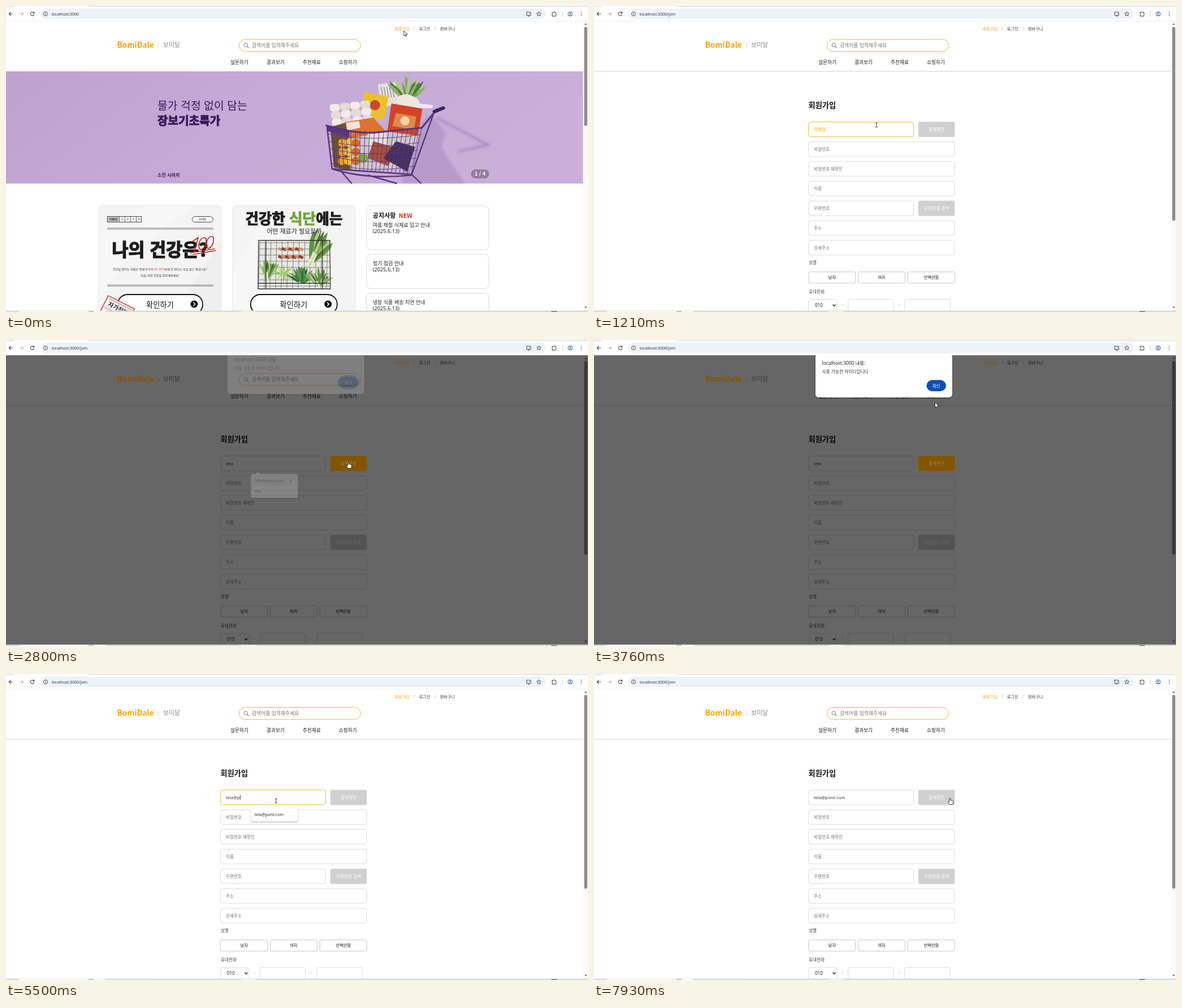
An HTML page that plays this animation: 1030 by 543 pixels, repeating every 8 s.

```html
<!DOCTYPE html>
<html lang="ko">
<head>
<meta charset="utf-8">
<title>회원가입</title>
<style>
html, body { margin: 0; width: 100%; height: 100%; overflow: hidden; background: #fff; }
svg { display: block; width: 1030px; height: 543px; }
text { font-family: 'Noto Sans CJK KR', 'Noto Sans KR', sans-serif; white-space: pre; }
text.latin { font-family: 'Noto Sans', 'Noto Sans CJK KR', sans-serif; }
</style>
</head>
<body>
<svg id="stage" viewBox="0 0 1030 543" xmlns="http://www.w3.org/2000/svg">
  <defs>
    <linearGradient id="lilac" x2="1" y2=".25">
      <stop offset="0" stop-color="#bfa1cf"/><stop offset=".45" stop-color="#c5a9d6"/><stop offset="1" stop-color="#c9afd9"/>
    </linearGradient>
    <filter id="lift" x="-10%" y="-20%" width="120%" height="150%">
      <feDropShadow dx="0" dy="1" stdDeviation="1.3" flood-opacity=".4"/>
    </filter>
    <filter id="blur"><feGaussianBlur stdDeviation="2"/></filter>
  </defs>
</svg>
<script>
const stage = document.getElementById('stage');
const ORANGE = '#ffa500', LINE = '#dcdcdc';

function add(parent, tag, attrs, text) {
  const node = document.createElementNS('http://www.w3.org/2000/svg', tag);
  for (const k in attrs) node.setAttribute(k, attrs[k]);
  if (text !== undefined) node.textContent = text;
  parent.appendChild(node);
  return node;
}
const group = (parent, attrs = {}) => add(parent, 'g', attrs);
// y is the middle of the line of text
const label = (p, x, y, size, text, fill = '#333', more = {}) =>
  add(p, 'text', { x, y: y + size * .36, 'font-size': size, fill, ...more }, text);
const rect = (p, x, y, w, h, fill, more = {}) =>
  add(p, 'rect', { x, y, width: w, height: h, fill, ...more });
const box = (p, x, y, w, h, rx, stroke = LINE, fill = '#fff') =>
  rect(p, x, y, w, h, fill, { rx, stroke });
const path = (p, d, stroke, width = 1, more = {}) =>
  add(p, 'path', { d, fill: 'none', stroke, 'stroke-width': width, ...more });
const shape = (p, d, fill, more = {}) => add(p, 'path', { d, fill, ...more });
const dot = (p, cx, cy, r, fill, more = {}) => add(p, 'circle', { cx, cy, r, fill, ...more });
const show = (node, on) => node.setAttribute('opacity', on ? 1 : 0);
const MID = { 'text-anchor': 'middle' }, BOLD = { 'font-weight': 700 }, LATIN = { class: 'latin' };
// Extra heavy display lettering
const heavy = (color, width) => ({ 'font-weight': 900, stroke: color, 'stroke-width': width });

let seed = 11;
const rnd = (a, b) => {
  seed = (seed * 16807) % 2147483647;
  return a + (b - a) * seed / 2147483647;
};

// Slim leaves fanning out from a root
function leaves(p, x, y, n, len, from, to, colors) {
  for (let i = 0; i < n; i++) {
    const a = rnd(from, to), l = rnd(.5, 1) * len, w = rnd(.08, .2);
    const tip = (turn, k) => `${x + Math.cos(a + turn) * l * k} ${y - Math.sin(a + turn) * l * k}`;
    shape(p, `M${x} ${y}Q${tip(w, .75)} ${tip(0, 1)}Q${tip(-w, .75)} ${x} ${y}`, colors[i % colors.length]);
  }
}

function buildCart(p) {
  shape(p, 'M705 235L752 192L778 226L770 250L812 315H700Z', '#a384bb', { opacity: .45, filter: 'url(#blur)' });
  path(p, 'M762 198L852 246M856 246L800 258', '#9a79b4', 4, { opacity: .6, filter: 'url(#blur)' });
  // groceries
  const greens = ['#6a9a4a', '#8fb565', '#4a7a38', '#b3cb88'];
  shape(p, 'M658 139L690 135L694 172L664 182Z', '#e2dfe0');
  for (let i = 0; i < 5; i++) path(p, `M${664 + i * 5} 144l3 18`, '#777', 1);
  leaves(p, 709, 170, 46, 48, .6, 2.4, greens);
  shape(p, 'M692 162Q706 152 722 161Q736 166 730 182L692 184Z', '#ede9da');
  shape(p, 'M724 172L756 176L754 181L722 182Z', '#eee9ee');
  shape(p, 'M634 152L677 161L668 203L627 192Z', '#ecc02a');
  dot(p, 653, 176, 9, '#cf4630');
  for (let r = 0; r < 3; r++) for (let i = 0; i < 4; i++)
    rect(p, 573 + i * 18 + r * 2, 174 + r * 13 - i * 2, 17.5, 13, ['#f1ece7', '#e4dcd8'][(i + r) % 2], { rx: 5 });
  shape(p, 'M682 173L737 182L728 234L675 222Z', '#d24426');
  shape(p, 'M690 190L726 196L722 220L684 213Z', '#dd8a4a');
  dot(p, 706, 204, 8, '#f0d3a6');
  shape(p, 'M574 215L604 206L610 292L580 286Z', '#6d5135');
  shape(p, 'M600 206L650 198L672 222L606 236Z', '#dd7330');
  shape(p, 'M602 207L625 204L627 216L604 221Z', '#f0e5da');
  shape(p, 'M608 238L668 222L728 230L714 288L612 292Z', '#cfc5cf');
  for (let i = 0; i < 9; i++) dot(p, 595 + (i % 3) * 12, 243 + (i / 3 | 0) * 16, 7.5, ['#e99a2c', '#efbf3d', '#d66a2c'][i % 3]);
  shape(p, 'M640 226L672 222L676 258L646 264Z', '#e6e2e1');
  shape(p, 'M650 240L692 252L676 284L640 270Z', '#a8503f');
  shape(p, 'M690 240L724 250L710 294L668 270Z', '#45315c');
  dot(p, 632, 270, 9, '#86a553');
  // cart frame
  const ink = '#55357b';
  for (let i = 0; i <= 20; i++) {
    const k = i / 20;
    path(p, `M${568 + 168 * k} ${214 + 8 * Math.sin(k * 3.1)}L${577 + 140 * k} ${289 + 10 * k}`, ink, .9);
  }
  for (let j = 1; j < 6; j++)
    path(p, `M${568 + j * 1.7} ${214 + j * 13}Q${640} ${228 + j * 14} ${738 - j * 3} ${214 + j * 14}`, ink, .9);
  shape(p, 'M567 211L607 220L608 233L568 222Z', '#59357f');
  path(p, 'M567 212Q610 226 650 225L736 216L757 190L774 182', ink, 3, { 'stroke-linecap': 'round' });
  path(p, 'M757 190L718 299L577 289L568 214M718 299L735 315M577 289Q640 309 718 300M592 292L612 315M640 300L692 315', ink, 2.4);
  path(p, 'M758 187L774 181', '#3b2360', 6, { 'stroke-linecap': 'round' });
}

function goButton(p, x, w, tx, cx) {
  box(p, x, 512, w, 35, 17, '#111').setAttribute('stroke-width', 1.8);
  label(p, tx, 530, 13.3, '확인하기', '#111', { ...MID, 'font-weight': 500 });
  dot(p, cx, 529, 6.5, '#111');
  path(p, `M${cx - 1.5} 525.8l3 3.2l-3 3.2`, '#fff', 1.5);
}

function buildHome(p) {
  rect(p, 0, 116, 1021, 199, 'url(#lilac)');
  const plum = '#39195c', black = '#1c1c1c';
  label(p, 268, 177.5, 19.4, '물가 걱정 없이 담는', plum, { 'font-weight': 300 });
  label(p, 268, 203.5, 20.2, '장보기초특가', plum, heavy(plum, .9));
  label(p, 268, 300, 8.1, '소진 시까지', plum, BOLD);
  buildCart(p);
  rect(p, 823, 290, 32, 16, '#927da1', { rx: 8 });
  label(p, 839, 298, 9.2, '1 / 4', '#fff', { ...MID, ...BOLD });

  // health check card
  box(p, 164, 354, 217, 200, 7, '#e6e6e6', '#f4f4f4');
  shape(p, 'M165 400L250 356H330L220 440L165 520Z', '#f7f7f7');
  shape(p, 'M300 540L380 420V540Z', '#efefef');
  box(p, 179.5, 373.5, 60, 10, 0, '#444', 'none');
  rect(p, 180, 374, 20, 9, '#ccc');
  label(p, 190, 378.5, 4.4, '수험번호', '#111', { ...MID, ...BOLD });
  for (let i = 0; i < 4; i++) {
    path(p, `M${200.5 + i * 10} 373.5v10`, '#444', .8);
    label(p, 205.5 + i * 10, 378.5, 5, i + 1, '#222', MID);
  }
  box(p, 329.5, 373.5, 37, 10, 5, '#444', '#fafafa');
  label(p, 348, 378.5, 4.6, '보미달', '#222', MID);
  path(p, 'M179 394h188M179 396h188M179 495h188M179 497h188', '#666', .8);
  label(p, 187.5, 432.5, 31.5, '나의 건강은?', black, heavy(black, 1.5));
  path(p, 'M331 417L340 411L333 436M351 411C341 411 338 432 345 432C353 432 358 411 351 411M364 409C355 409 351 429 358 430C366 430 371 409 364 409M326 438L369 431M331 441L371 434', '#b3271f', 1.7, { 'stroke-linecap': 'round' });
  const line = label(p, 272.5, 467, 5.1, '', '#333', MID);
  add(line, 'tspan', {}, '건강을 챙기는 사람은 전체 인구의 ');
  add(line, 'tspan', { fill: '#d33a2c' }, '20~30%');
  add(line, 'tspan', {}, '밖에 안 된다는 사실 알고 계셨나요?');
  label(p, 272.5, 478, 5.1, '지금, 바로 건강을 확인해보세요!', '#333', MID);
  goButton(p, 198, 150, 272.5, 333);
  const stamp = group(p, { transform: 'translate(181 514) rotate(27)' });
  rect(stamp, 0, 0, 52, 42, '#f8f5f3', { stroke: '#d2412f', 'stroke-width': 1.6 });
  path(stamp, 'M3 4H49M3 21H49', '#d2412f', .8);
  label(stamp, 26, 12.5, 10.5, '자가진단', '#222', { ...MID, ...BOLD });

  // diet card
  box(p, 401, 354, 217, 200, 7, '#e6e6e6', '#f4f4f4');
  shape(p, 'M402 470L470 356H560L450 540H402Z', '#f7f7f7');
  const head = label(p, 509.5, 378, 25.6, '', black, { ...MID, 'font-weight': 900, 'stroke-width': 1.1 });
  [['건강한 ', black], ['식단', '#6ea63b'], ['에는', black]].forEach(([s, c]) => add(head, 'tspan', { fill: c, stroke: c }, s));
  rect(p, 449, 418, 123, 83, '#e8e8e3');
  for (let i = 0; i < 13; i++) path(p, `M${449 + i * 10} 418l-2 83`, '#555', .7);
  for (let j = 0; j < 8; j++) path(p, `M448 ${420 + j * 11}h125`, '#555', .7);
  const green = ['#5f9145', '#8bb35f', '#456f36', '#b4cd8e'];
  for (let i = 0; i < 14; i++) {
    const x = 482 + (i % 7) * 6, y = i < 7 ? 430 : 444;
    path(p, `M${x} ${y}l8 3`, i % 2 ? '#8b4038' : '#c59770', 5);
  }
  leaves(p, 538, 460, 40, 66, .7, 1.5, green);
  path(p, 'M534 462L545 437M539 463L549 440', '#e5ebc7', 4);
  leaves(p, 492, 474, 50, 17, 0, 6.3, ['#a8ce6c', '#86b654', '#c3dd8d']);
  leaves(p, 462, 488, 34, 40, .9, 2, green);
  leaves(p, 524, 494, 40, 34, .5, 2.6, ['#2e6530', '#47813d', '#5d9450']);
  leaves(p, 554, 498, 40, 36, .5, 2.5, green);
  path(p, 'M461 472L464 490M518 490L528 497M550 488L556 500', '#e9eccf', 3);
  path(p, 'M447 416H573L574 502H446ZM446 492H574M460 416V502M560 416V502', '#333', 1.3);
  label(p, 510, 400, 11, '어떤 재료가 필요할까', '#222', { ...MID, 'font-weight': 500 });
  goButton(p, 433, 153, 509, 570);

  // notices
  [[354, 79], [440, 62], [509, 62]].forEach(([y, h]) => box(p, 638.5, y + .5, 216, h - 1, 7));
  label(p, 649, 372, 11.1, '공지사항', '#111', BOLD);
  label(p, 695, 372, 10.6, 'NEW', '#e0311f', BOLD);
  [[389, '여름 제철 식재료 입고 안내', '.'], [457, '정기 점검 안내', ','], [526, '냉장 식품 배송 지연 안내', '.']].forEach(([y, s, c]) => {
    label(p, 649, y, 9, s, '#222');
    label(p, 649, y + 10.8, 9.2, `(2025${c}6${c}13)`, '#222', LATIN);
  });
}

function buildJoin(p) {
  path(p, 'M0 116H1021', '#d4d4d4', 1.2);
  label(p, 379.5, 176, 13.2, '회원가입', '#111', BOLD);
  ['비밀번호', '비밀번호 재확인', '이름', '우편번호', '주소', '상세주소'].forEach((s, i) => {
    const y = 240.9 + i * 35;
    box(p, 379.7, y, i === 3 ? 186 : 258.6, 26, 4);
    label(p, 389, y + 13, 7.6, s, '#757575');
  });
  rect(p, 574, 345.5, 64.5, 27, '#d0d0d0', { rx: 2.5 });
  label(p, 606.3, 359, 7.6, '우편번호 검색', '#fff', MID);
  label(p, 380, 455, 7.6, '성별', '#444');
  ['남자', '여자', '선택안함'].forEach((s, i) => {
    box(p, 379.8 + i * 87.8, 471.8, 83, 20, 2, '#c8c8c8');
    label(p, 421.3 + i * 87.8, 481.5, 7.3, s, '#111', MID);
  });
  label(p, 380, 507, 7.6, '휴대전화', '#444');
  [[379.8, 50], [449.8, 80], [549.8, 81]].forEach(([x, w]) => box(p, x, 520.8, w, 24, 3));
  label(p, 391, 531, 8, '010', '#222', LATIN);
  path(p, 'M422.5 529.8l2.5 2.6l2.5-2.6', '#111', 1.3);
  label(p, 440, 531, 8, '-', '#777', MID);
  label(p, 540, 531, 8, '-', '#777', MID);
}

function buildHeader(p) {
  label(p, 731, 40, 7.2, '로그인');
  label(p, 768, 40, 7.2, '장바구니');
  path(p, 'M722.5 37v6M759.5 37v6', '#ccc', .8);
  path(p, 'M269.5 66v8', '#ccc', .9);
  label(p, 278, 69, 10.9, '보미달', '#8a8a8a', { 'font-weight': 500 });
  box(p, 412.5, 59.3, 215, 21.4, 10.7, '#f4b545');
  dot(p, 424.3, 69.3, 3.2, 'none', { stroke: '#777' });
  path(p, 'M426.6 71.6l3 3', '#777', 1.1);
  label(p, 435, 70, 8.8, '검색어를 입력해주세요', '#777');
  ['설문하기', '결과보기', '추천재료', '쇼핑하기'].forEach((s, i) =>
    label(p, 397 + i * 64, 100, 8.7, s, '#222', { 'font-weight': 500 }));
}

function buildBrowser(p) {
  rect(p, 0, 0, 1030, 27, '#fff');
  rect(p, 0, 0, 14, 1.6, '#d3e3fd');
  rect(p, 146, 0, 884, 1.6, '#d3e3fd');
  rect(p, 61, 4.5, 894, 18.5, '#eef2f9', { rx: 9 });
  path(p, 'M0 26.7H1030', '#e6e9ee', .7);
  path(p, 'M12 14H5.5M8.3 11L5.3 14L8.3 17', '#444', 1.1);
  path(p, 'M24 14H30.5M27.7 11L30.7 14L27.7 17', '#bbb', 1.1);
  path(p, 'M49.3 12.2A3.2 3.2 0 1 0 49.6 15M49.8 10.3V12.8H47.2', '#444', 1.1);
  dot(p, 70, 14, 3.6, 'none', { stroke: '#444', 'stroke-width': .9 });
  path(p, 'M70 13.4v2.4M70 11.7v1', '#444', 1);
  path(p, 'M926 10.8H921.5V16.5H929V14.5M923.5 18.2H927M927.8 10V13.5M926 12L927.8 13.8L929.6 12', '#444', 1);
  path(p, 'M943 10l1.1 2.7l2.9.2l-2.2 1.9l.7 2.8l-2.5-1.5l-2.5 1.5l.7-2.8l-2.2-1.9l2.9-.2Z', '#444', .9);
  path(p, 'M966.5 11.5H969a1.2 1.2 0 0 1 2.4 0H973V14a1.2 1.2 0 0 1 0 2.2V18H966.5V16a1.3 1.3 0 0 0 0-2.4Z', '#333', 1);
  path(p, 'M984.5 9v10', '#ccd9ee', 1);
  dot(p, 998.5, 14, 4, '#e4edfc', { stroke: '#3568b0', 'stroke-width': .9 });
  dot(p, 998.5, 12.7, 1.3, '#3568b0');
  path(p, 'M996 16.6q2.5-2 5 0', '#3568b0', 1);
  for (let i = -1; i < 2; i++) dot(p, 1018, 14 + i * 3, .8, '#444');
}

const page = group(stage);
rect(page, 0, 0, 1030, 543, '#fff');
const home = group(page), join = group(page);
buildHome(home);
buildJoin(join);
const email = box(join, 379.7, 205.9, 186, 26, 4);
const emailText = label(join, 389, 219, 7.6, '', '#333');
const caret = rect(join, 0, 214.5, .8, 8.5, '#111');
buildHeader(page);
rect(page, 1021, 27, 9, 514, '#fbfbfb');
const thumb = rect(page, 1023.3, 37, 5.4, 344, '#8b8b8b', { rx: 2.7 });
shape(page, 'M1023.5 33.5h5l-2.5-3ZM1023.5 533.5h5l-2.5 3Z', '#777');
const scrim = rect(stage, 0, 27, 1030, 514, '#000');

// Orange parts keep more colour than the rest of the dimmed page
const accent = group(stage);
const check = group(accent);
const checkBox = rect(check, 574, 205.5, 64.5, 27, '#d0d0d0', { rx: 2.5 });
const checkText = label(check, 606.3, 219, 7.6, '중복확인', '#fff', MID);
const golds = [
  label(accent, 688, 40, 7.2, '회원가입'),
  label(accent, 196.5, 69, 13.7, 'BomiDale', ORANGE, BOLD),
];

const chrome = group(stage);
buildBrowser(chrome);
const url = label(chrome, 81, 14, 7.1, '', '#333', LATIN);
rect(chrome, 0, 540.5, 1030, 3, '#d3dce3');
rect(chrome, 23, 541, 153, 2, '#fafafa');
rect(chrome, 146, 541.5, 9, 2, '#c9b08e');
rect(chrome, 416, 541, 26, 2, '#eef2f5');
rect(chrome, 965, 541.8, 10, 1.2, '#555');

const MAIL = 'tela@ponil.com';
const popup = group(stage);
const popBox = rect(popup, 433.5, 238, 83, 43, '#fff', { rx: 3, filter: 'url(#lift)' });
shape(popup, 'M441 238.5L445 234.5L449 238.5Z', '#fff');
const hot = group(popup);
rect(hot, 434.5, 241, 81, 18, '#efefef');
path(hot, 'M502.2 247.5l4 4M506.2 247.5l-4 4', '#333', .9);
label(popup, 440, 249.5, 7, MAIL, '#222', LATIN);
const second = label(popup, 440, 268.5, 7, MAIL.slice(0, 4), '#222', LATIN);

const dialog = group(stage);
rect(dialog, 392, 24, 242, 78, '#fff', { rx: 6, filter: 'url(#lift)' });
label(dialog, 403.5, 41, 8.4, 'localhost:3000 내용:', '#222', LATIN);
label(dialog, 403.5, 56.5, 7.7, '사용 가능한 아이디입니다', '#333');
const ring = rect(dialog, 587, 69.5, 37.5, 23, 'none', { rx: 11.5, stroke: '#0b50b5', 'stroke-width': 1 });
rect(dialog, 588.5, 71, 34.5, 20, '#0b50b5', { rx: 10 });
label(dialog, 605.7, 81, 7.4, '확인', '#fff', MID);

const pointers = { arrow: group(stage), hand: group(stage), beam: group(stage) };
const EDGE = { stroke: '#111', 'stroke-width': .8, 'stroke-linejoin': 'round' };
shape(pointers.arrow, 'M0 0V9L2.1 7.1L3.5 10.2L5 9.5L3.6 6.5H6.4Z', '#fff', EDGE);
shape(pointers.hand, 'M-1 .8Q0-.6 1 .8V4.2Q2 3.4 2.8 4.5Q3.8 3.9 4.4 4.9Q5.6 4.5 5.7 6V8.5Q5.3 10 4.6 11.3H-.6L-3.6 7.3Q-3.5 5.6-1 7Z', '#fff', EDGE);
path(pointers.beam, 'M-2-4Q0-4 0-3Q0-4 2-4M0-3V3M-2 4Q0 4 0 3Q0 4 2 4', '#222', .9);

// time, x, y, pointer
const MOVES = [
  [0, 704, 44, 'arrow'], [70, 704, 44, 'hand'], [210, 704, 44, 'hand'], [280, 690, 56, 'arrow'],
  [870, 500, 165, 'arrow'], [930, 500, 168, 'arrow'], [1140, 500, 211, 'beam'], [2180, 500, 211, 'beam'],
  [2250, 500, 222, 'beam'], [2390, 512, 245, 'arrow'], [2460, 548, 236, 'arrow'], [2530, 590, 222, 'hand'],
  [2600, 606, 217, 'hand'], [3200, 606, 215, 'arrow'], [3900, 603, 85, 'arrow'], [4110, 603, 85, 'arrow'],
  [4500, 488, 215, 'beam'], [4640, 478, 225, 'beam'], [7580, 478, 225, 'beam'], [7650, 535, 224, 'beam'],
  [7720, 640, 220, 'arrow'], [7790, 666, 219, 'arrow'], [7860, 666, 219, 'arrow'], [7930, 630, 220, 'hand'],
];
const KEYS = [1290, 1360, 1430, 1500, 4970, 5500, 5660, 5820, 6020, 6190, 6500, 6770, 7110, 7250];
const POPUP = [[0, 0], [1290, 1], [2730, .5], [2800, .2], [2870, 0], [4710, 1], [7180, .6], [7250, .3], [7320, 0]];
// time, opacity, vertical shift
const DIALOG = [[0, 0, 0], [2800, .16, -6], [2870, .8, -2], [2940, 1, 0], [4040, .5, -3], [4110, .15, -6], [4180, 0, 0]];

const at = (table, t) => table.filter(row => row[0] <= t).pop();
const within = (t, a, b) => t >= a && t < b;

function movePointer(t) {
  const i = MOVES.filter(m => m[0] <= t).length - 1;
  const a = MOVES[i], b = MOVES[i + 1] || a;
  const k = b === a ? 0 : (t - a[0]) / (b[0] - a[0]);
  const x = a[1] + (b[1] - a[1]) * k, y = a[2] + (b[2] - a[2]) * k;
  for (const kind in pointers) show(pointers[kind], kind === a[3]);
  pointers[a[3]].setAttribute('transform', `translate(${x} ${y})`);
}

function render(t) {
  const atHome = t < 140, dim = within(t, 2800, 3970);
  const focus = within(t, 1140, 2690) || within(t, 4640, 7860);
  const typed = MAIL.slice(0, KEYS.filter(k => k <= t).length);
  show(home, atHome);
  show(join, !atHome);
  show(check, !atHome);
  url.textContent = 'localhost:3000' + (atHome ? '' : '/join');
  thumb.setAttribute('height', atHome ? 176 : 344);

  email.setAttribute('stroke', focus ? '#f7b336' : LINE);
  emailText.textContent = typed || '이메일';
  emailText.setAttribute('class', typed ? 'latin' : '');
  emailText.setAttribute('fill', typed ? '#333' : focus ? ORANGE : '#757575');
  show(caret, focus && typed);
  if (typed) caret.setAttribute('x', 389.3 + emailText.getComputedTextLength());

  const gold = dim ? '#835500' : ORANGE;
  golds.forEach(g => g.setAttribute('fill', gold));
  checkBox.setAttribute('fill', within(t, 2530, 3970) ? gold : '#d0d0d0');
  checkText.setAttribute('fill', dim ? '#8d8574' : '#fff');
  scrim.setAttribute('opacity', dim ? .6 : 0);

  const two = t < 4970;
  popup.setAttribute('opacity', at(POPUP, t)[1]);
  popBox.setAttribute('height', two ? 42 : 23.5);
  show(second, two);
  show(hot, within(t, 2390, 2870));

  const [, alpha, shift] = at(DIALOG, t);
  dialog.setAttribute('opacity', alpha);
  dialog.setAttribute('transform', `translate(0 ${shift})`);
  show(ring, t < 3200);
  movePointer(t);
}

const start = performance.now();
function tick() {
  render((performance.now() - start) % 8000);
  requestAnimationFrame(tick);
}
tick();
</script>
</body>
</html>
```
